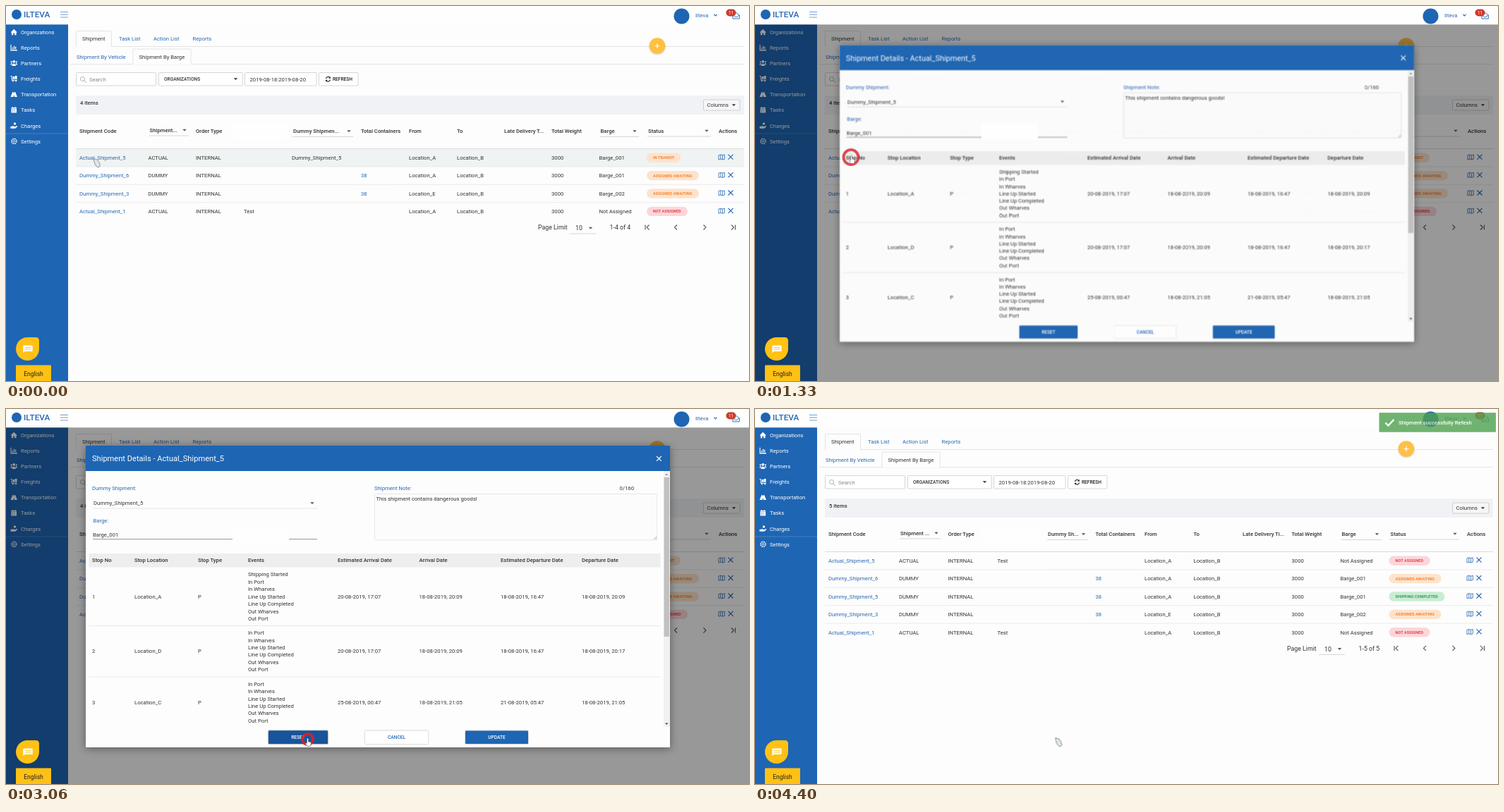
Animation, 1053 px wide and 532 px high, one loop 4.73 s. Source, as an HTML page:

```html
<!DOCTYPE html>
<html lang="en">
<head>
<meta charset="utf-8">
<title>Shipment reset</title>
<style>
html, body { margin: 0; width: 100%; height: 100%; overflow: hidden; background: #fdfdfd; }
svg { display: block; width: 100vw; height: 100vh; }
text { font: 7.7px Roboto, Arial, sans-serif; fill: #333; white-space: pre; }
.b { font-weight: 500; }
.link { fill: #2768b3; }
.white { fill: #fff; }
#modal { transform-origin: 527px 266.5px; }
#spin { transform-origin: 553px 229px; animation: spin 1s linear infinite; }
@keyframes spin { to { transform: rotate(360deg); } }
</style>
</head>
<body>
<script>
const LOOP = 4730;
let css = '';

// Each key is [ms, declarations, easing]; "step-end" holds until the next key.
function anim(id, ...keys) {
  const body = keys.map(([ms, decl, ease]) =>
    `${(ms / LOOP * 100).toFixed(3)}%{${decl};animation-timing-function:${ease || 'linear'}}`).join('');
  css += `@keyframes ${id}{${body}}#${id}{animation:${id} ${LOOP}ms infinite}`;
}

const fade = (id, ...keys) => anim(id, ...keys.map(([ms, o, e]) => [ms, `opacity:${o}`, e]));

// y is the middle of the capitals
function text(x, y, str, cls = '', size = 7.7, extra = '') {
  return `<text x="${x}" y="${(y + size * .355).toFixed(2)}" class="${cls}" style="font-size:${size}px;${extra}">${str}</text>`;
}
const mid = (x, y, str, cls, size, extra = '') => text(x, y, str, cls, size, 'text-anchor:middle;' + extra);
const rect = (x, y, w, h, fill, more = '') => `<rect x="${x}" y="${y}" width="${w}" height="${h}" fill="${fill}" ${more}/>`;
const frame = (x, y, w, h, fill = '#fff', edge = '#ccc') =>
  rect(x + .5, y + .5, w - 1, h - 1, fill, `stroke="${edge}" stroke-width=".8" rx="1"`);
const path = (d, stroke = '#1e65b3', width = 1, fill = 'none') =>
  `<path d="${d}" fill="${fill}" stroke="${stroke}" stroke-width="${width}"/>`;
const hline = (x1, x2, y, color = '#ddd', w = .8) => path(`M${x1} ${y}H${x2}`, color, w);
const solid = (d, color) => `<path d="${d}" fill="${color}"/>`;
const caret = (x, y, color = '#555') => solid(`M${x - 2.7} ${y - 1.3}h5.4l-2.7 2.8z`, color);
const disc = (x, y, r, fill, more = '') => `<circle cx="${x}" cy="${y}" r="${r}" fill="${fill}" ${more}/>`;
const group = (id, ...parts) => `<g id="${id}">${parts.join('')}</g>`;

function sidebar() {
  const names = ['Organizations', 'Reports', 'Partners', 'Freights', 'Transportation', 'Tasks', 'Charges', 'Settings'];
  const icons = [
    'M0 5L5 0l5 5h-1.5v4h-2.5V6h-2v3H1.500V5z',
    'M0 0h1.200v7.500H10V9H0zM2.500 4h1.300v2.700H2.500zM4.700 2h1.300v4.700H4.700zM6.900 3h1.300v3.700H6.900z',
    'M3 2a2 2 0 1 1 4 0a2 2 0 1 1-4 0M2 8.500c0-4.500 6-4.500 6 0zM0 2.500a1.200 1.200 0 1 1 2.400 0a1.200 1.200 0 1 1-2.400 0M7.600 2.500a1.200 1.200 0 1 1 2.400 0a1.200 1.200 0 1 1-2.400 0M0 7c0-3 2-3 2.500-2L1.500 7zM10 7c0-3-2-3-2.500-2L8.500 7z',
    'M0 0h2l.6 6H10v1.200H1.600L1 1.200H0zM3.200 1h2.800v4H3.200zM6.500 0h3v5h-3zM2.500 8a1 1 0 1 1 2 0a1 1 0 1 1-2 0M7 8a1 1 0 1 1 2 0a1 1 0 1 1-2 0',
    'M3 1h1.500v2h1V1H7l3 7.500H5.600V6H4.400v2.500H0z',
    'M1 1h1.500V0h1.200v1h2.600V0h1.200v1H9v1.500H1zM1 3.200h8V9H1zM2.500 4.500v1h1.300v-1zM5.200 4.500v1h1.300v-1zM2.500 6.700v1h1.300v-1zM5.200 6.700v1h1.300v-1z',
    'M0 6h2c2-1.500 3 0 5 .3L10 5v1.500L7 9H0zM4.500 2a1.800 1.800 0 1 1 3.600 0a1.800 1.800 0 1 1-3.600 0'
  ];
  const items = names.map((name, i) => {
    const y = 37.5 + 22.05 * i;
    const icon = icons[i]
      ? `<path transform="translate(6.500 ${y - 4.7}) scale(.95)" d="${icons[i]}" fill="#fff" fill-rule="evenodd"/>`
      : disc(11.5, y, 3.6, 'none', 'stroke="#fff" stroke-width="1.300" stroke-dasharray="2 .8"') +
        disc(11.5, y, 1.4, 'none', 'stroke="#fff" stroke-width=".9"');
    return icon + text(21, y, name, 'white');
  });
  return rect(0, 26, 88, 506, '#1e65b3') + hline(0, 88, 181, '#4f8ac8') + items.join('');
}

function toolbar() {
  return hline(99, 1046, 57.5) + frame(99, 35, 51, 23, '#fdfdfd', '#ddd') + rect(100, 56.5, 49, 2, '#fdfdfd') +
    text(108, 46.5, 'Shipment') + text(160, 46.5, 'Task List', 'link') +
    text(209, 46.5, 'Action List', 'link') + text(264.5, 46.5, 'Reports', 'link') +
    hline(91, 1046, 82.5) + frame(179.5, 60.5, 83, 23, '#fdfdfd', '#ddd') + rect(180.5, 81.5, 81, 2, '#fdfdfd') +
    text(100, 72, 'Shipment By Vehicle', 'link') + text(188.5, 72, 'Shipment By Barge') +
    frame(99, 94, 114, 19.5) + disc(108.5, 103.5, 3, 'none', 'stroke="#999" stroke-width=".8"') +
    path('M110.700 105.700l3 3', '#999', .9) + text(118, 104, 'Search', '', 7.7, 'fill:#888') +
    frame(216, 94, 120, 19.5) + text(224, 104, 'ORGANIZATIONS', 'b', 6.6) + caret(325.5, 103.5, '#333') +
    frame(338, 94, 102.5, 19.5) + text(345.5, 104, '2019-08-18:2019-08-20') +
    frame(443, 94, 56.5, 19.5) + path('M453.500 103a3 3 0 0 1 5.500-1.200M459.500 104.500a3 3 0 0 1-5.500 1.200', '#222', 1.2) +
    solid('M459.800 100v2.700h-2.700zM453 107.500v-2.700h2.700z', '#222') + text(463, 104, 'REFRESH', 'b', 6.6, 'fill:#222') +
    rect(99, 127, 947, 27, '#f1f2f5') + frame(988, 132.5, 52.5, 16, '#f6f6f7', '#c4c4c4') +
    text(993.5, 140.5, 'Columns') + caret(1031.5, 140.5, '#333') +
    disc(923, 56.5, 11.3, '#ffc044', 'style="filter:drop-shadow(0 1px 1px #0003)"') + path('M919.500 56.500h7M923 53v7', '#fff', 1.2);
}

const badges = {
  'IN TRANSIT': [48, '#f58232', '#fde3cc'],
  'ASSIGNED AWAITING': [74, '#f58232', '#fde3cc'],
  'NOT ASSIGNED': [58, '#e5404a', '#fcd6d9'],
  'SHIPPING COMPLETED': [79, '#2a9d4e', '#c9ecd4']
};

function badge(x, y, label) {
  const [w, ink, fill] = badges[label];
  return rect(x, y - 6.7, w, 13.4, fill, 'rx="6.700"') +
    text(x + 9, y, label, '', 5.5, `font-weight:700;letter-spacing:.1px;fill:${ink}`);
}

// cols: x of code, type, order, note, dummy, containers, from, to, late, weight, barge, status, actions
function table(id, cols, heads, pickers, rows) {
  const head = heads.map((h, i) => {
    const p = pickers[i];
    if (!p) return text(cols[i], 177, h, 'b');
    const y = p[2];
    return text(p[0], y, h, 'b') + caret(p[1], y) + hline(p[0] - 1, p[1] + 6, y + 8, '#ccc');
  }).join('');
  const body = rows.map((r, i) => {
    const y = 215.2 + 25.4 * i, a = cols[12];
    return hline(99, 1046, y - 12.7, i ? '#e6e6e6' : '#d2d2d2') +
      r.map((v, c) => !v ? '' : c === 11 ? badge(cols[c], y, v) : text(cols[c], y, v, c === 0 || c === 5 ? 'link' : '')).join('') +
      path(`M${a} ${y - 3.5}l2.800-.8l2.800 .8l2.800-.8v6.300l-2.800 .8l-2.800-.8l-2.800 .8zM${a + 2.8} ${y - 4.3}v6.300M${a + 5.6} ${y - 3.5}v6.300`, '#2768b3', .8) +
      path(`M${a + 13.5} ${y - 4.5}l7 7m0-7l-7 7`, '#2768b3', 1.2);
  }).join('');
  const n = rows.length, y = 314 + 25.4 * (n - 4);
  const pager = text(754, y, 'Page Limit', '', 8.8) + text(807, y + 1, '10', '', 8.8) + caret(828.5, y + 1) +
    hline(799, 836, y + 9, '#ccc') + text(855.5, y, `1-${n} of ${n}`, '', 8.8) +
    path(`M906 ${y - 3.5}v7m5.500-7l-3.500 3.500l3.500 3.500M951 ${y - 3.5}l-3.500 3.500l3.500 3.500M988.500 ${y - 3.5}l3.500 3.500l-3.500 3.500M1028 ${y - 3.5}l3.500 3.500l-3.500 3.500m5.500-7v7`, '#555', 1.1);
  return group(id, text(105, 137.5, `${n} items`, 'b'), head, body, pager);
}

const actual = (code, barge, status, note, dummy) =>
  [code, 'ACTUAL', 'INTERNAL', note, dummy, '', 'Location_A', 'Location_B', '', '3000', barge, status];
const dummy = (n, from, barge, status) =>
  ['Dummy_Shipment_' + n, 'DUMMY', 'INTERNAL', '', '', '38', 'Location_' + from, 'Location_B', '', '3000', 'Barge_00' + barge, status];

const waiting = 'ASSIGNED AWAITING', free = 'NOT ASSIGNED';
const six = dummy(6, 'A', 1, waiting), three = dummy(3, 'E', 2, waiting);
const one = actual('Actual_Shipment_1', 'Not Assigned', free, 'Test', '');

const before = table('before',
  [104, 201.5, 269, 337, 405, 503, 571, 639, 706, 773, 840.5, 908, 1010],
  ['Shipment Code', 'Shipment...', 'Order Type', '', 'Dummy Shipmen...', 'Total Containers', 'From', 'To',
    'Late Delivery T...', 'Total Weight', 'Barge', 'Status', 'Actions'],
  { 1: [203.5, 253, 176], 4: [407, 486, 177.5], 10: [842.5, 891, 177.5], 11: [910, 993, 177] },
  [actual('Actual_Shipment_5', 'Barge_001', 'IN TRANSIT', '', 'Dummy_Shipment_5'), six, three, one]);

const after = table('after',
  [104, 204, 273.5, 343.5, 413, 482.5, 552, 621.5, 691, 760.5, 829.5, 898.5, 1009],
  ['Shipment Code', 'Shipment ...', 'Order Type', '', 'Dummy Sh...', 'Total Containers', 'From', 'To',
    'Late Delivery Ti...', 'Total Weight', 'Barge', 'Status', 'Actions'],
  { 1: [206, 257, 176], 4: [415, 465.5, 177.5], 10: [831.5, 881.5, 177.5], 11: [900.5, 992, 177] },
  [actual('Actual_Shipment_5', 'Not Assigned', free, 'Test', ''), six,
    dummy(5, 'A', 1, 'SHIPPING COMPLETED'), three, one]);

function modal() {
  const cols = [122, 182, 272, 343, 470, 585.5, 701, 816];
  const heads = ['Stop No', 'Stop Location', 'Stop Type', 'Events', 'Estimated Arrival Date', 'Arrival Date',
    'Estimated Departure Date', 'Departure Date'];
  const events = ['Shipping Started', 'In Port', 'In Wharves', 'Line Up Started', 'Line Up Completed', 'Out Wharves', 'Out Port'];
  const stops = [
    [266, '1', 'Location_A', 'P', '', '20-08-2019, 17:07', '18-08-2019, 20:09', '18-08-2019, 16:47', '18-08-2019, 20:09'],
    [343.5, '2', 'Location_D', 'P', '', '20-08-2019, 17:07', '18-08-2019, 20:09', '18-08-2019, 16:47', '18-08-2019, 20:17'],
    [416, '3', 'Location_C', 'P', '', '25-08-2019, 00:47', '18-08-2019, 21:05', '21-08-2019, 05:47', '18-08-2019, 21:05']
  ];
  const rows = stops.map(([y, ...cells], i) => {
    const list = i ? events.slice(1) : events;
    return cells.map((c, k) => text(cols[k], y, c)).join('') +
      list.map((e, k) => text(343, y + (k - (list.length - 1) / 2) * 10.45, e)).join('');
  }).join('');
  const button = (x, w, label, fill, cls) =>
    rect(x, 456.5, w, 18.5, fill, 'rx="1" style="filter:drop-shadow(0 .6px .8px #0005)"') + mid(x + w / 2, 465.7, label, 'b ' + cls, 6.6);
  return `<clipPath id="clip"><rect id="slot" x="80" y="20" width="894" height="500"/></clipPath>` +
    `<g id="modal" clip-path="url(#clip)">` +
    rect(113, 52, 828, 428, '#fdfdfd', 'rx="1" style="filter:drop-shadow(0 2px 6px #0006)"') +
    rect(113, 52, 828, 36, '#1e65b3') +
    text(122, 70.5, 'Shipment Details - Actual_Shipment_5', 'white', 11.1) +
    path('M922 67l6.800 6.800m0-6.800l-6.800 6.800', '#fff', 1.1) +
    text(122, 112.5, 'Dummy Shipment:', 'link') + text(124, 133.5, 'Dummy_Shipment_5') + caret(434, 133.5) +
    hline(124, 441, 141, '#ddd') + text(123.5, 158, 'Barge:', 'link') + text(123, 178.5, 'Barge_001') +
    hline(123, 441, 184.7, '#777') + text(522, 112.5, 'Shipment Note:', 'link') + text(869.5, 112.5, '0/160') +
    frame(522, 120, 401, 66.5, '#fcfcfc', '#e3e3e3') + text(524.5, 127.5, 'This shipment contains dangerous goods!') +
    path('M918 185l4-4m-1.500 4l1.500-1.500', '#888', .7) +
    rect(117.5, 205, 810, 19.5, '#eee') + heads.map((h, i) => text(cols[i], 214.5, h, 'b')).join('') +
    hline(117.5, 927.5, 307.5, '#e4e4e4') + hline(117.5, 927.5, 380, '#e4e4e4') + rows +
    rect(932, 88, 9, 363, '#f1f1f1') + rect(932.5, 97, 7.5, 226, '#c1c1c1') +
    solid('M934 94h4.500l-2.250-2.500z', '#999') + solid('M934 445.500h4.500l-2.250 2.500z', '#444') +
    button(372, 84, 'RESET', '#1e65b3', 'white') + group('hover', button(372, 84, 'RESET', '#17549b', 'white')) +
    button(509, 89, 'CANCEL', '#fff', 'link') + button(651, 89, 'UPDATE', '#1e65b3', 'white') + '</g>';
}

function navbar() {
  return rect(0, 0, 1053, 26.3, '#fefefe') + disc(15, 12, 7, '#1e65b3') +
    text(25, 12.3, 'ILTEVA', 'b link', 11.8) +
    path('M77 8.500h11M77 12.200h11M77 16h11', '#4f86c2', .8) +
    disc(957.5, 14.5, 11, '#1e65b3') + text(977, 13, 'Ilteva', 'link') + path('M1003.500 11.800l2 2l2-2', '#1e65b3', 1.2) +
    path('M1030 13l4.700-3.500l4.700 3.500v5h-9.400zM1030 13l4.700 3l4.700-3', '#2768b3', .9) +
    rect(1020.5, 4.5, 14, 10, '#cb3a2c', 'rx="5"') + mid(1027.5, 9.5, '11', 'white', 6.4);
}

function chat() {
  return solid('M30.500 470H42q5 0 5 5v11.500a16.500 16.500 0 1 1-16.500-16.500z', '#ffc114') +
    solid('M25.500 481.500h11q1.200 0 1.200 1.200v6q0 1.200-1.200 1.200h-9.500l-2.700 2.200v-9.400q0-1.200 1.200-1.200z', '#fff') +
    path('M27 484.600h8M27 487h8', '#ffc114', .9) +
    rect(14, 509.5, 50, 23, '#ffc114', 'rx="1"') + mid(39, 522, 'English', '', 8.5, 'fill:#222');
}

const ring = (id, x, y) => `<circle id="${id}" cx="${x}" cy="${y}" r="2" fill="none" stroke="#d6222b" stroke-width="3.800"/>`;

const scene = [
  sidebar(), group('row', rect(99, 202.5, 947, 25.4, '#eff3f3')), toolbar(), before, after,
  group('veil', rect(99, 203, 947, 101, '#f4f4ff')),
  group('loader', disc(553, 229, 5.5, 'none', 'id="spin" stroke="#c2c2c2" stroke-width="1.300" stroke-dasharray="29 5.500"'),
    text(562, 229, 'LOADING...', '', 6.9, 'fill:#bbb')),
  group('shade', rect(0, 26, 1053, 506, '#000')),
  modal(),
  rect(321, 166.5, 80, 23.3, '#fefefe', 'rx="3"'),
  navbar(),
  group('toast', rect(884.5, 5.3, 165.5, 27.4, '#51a351', 'rx="1"'),
    path('M893.500 19.500l4 4l8-8.500', '#fff', 2.4), text(912, 19, 'Shipment successfully Refesh', 'b white')),
  chat(), ring('ringA', 136, 214.5), ring('ringB', 427.5, 468.5),
  group('cursor',
    group('arrow', path('M.3 .3L6 2.500Q9 5.500 9.300 11Q8.500 13 6 12.800Q1 10 .3 .3z', '#82888d', .9, '#dfe5e8')),
    group('hand', path('M2.500 7V1.200a1 1 0 0 1 2 0V5l3 .6q1 .3 .8 1.600l-.7 4.200h-4.600L.6 8q.6-1.600 1.900-1z', '#666', .7, '#fff')))
];

fade('row', [0, 1, 'step-end'], [1130, 0], [4730, 0]);
fade('before', [0, 1, 'step-end'], [3800, 0], [4730, 0]);
fade('after', [0, 0, 'step-end'], [3800, 1], [4730, 1]);
fade('veil', [0, 0], [3250, 0], [3400, .2], [3930, .2], [4200, 0], [4730, 0]);
fade('loader', [0, 0], [3300, 0], [3400, .8], [3500, 1], [3800, 1], [4060, 0], [4730, 0]);
fade('shade', [0, 0], [1060, 0], [1195, .4], [3130, .4], [3300, 0], [4730, 0]);
fade('toast', [0, 0], [3200, 0], [3390, .82], [4730, .82]);
fade('hover', [0, 0], [2560, 0], [2660, 1], [4730, 1]);
fade('arrow', [0, 1, 'step-end'], [330, 0, 'step-end'], [1930, 1, 'step-end'], [2530, 0, 'step-end'], [3260, 1], [4730, 1]);
fade('hand', [0, 0, 'step-end'], [330, 1, 'step-end'], [1930, 0, 'step-end'], [2530, 1, 'step-end'], [3260, 0], [4730, 0]);

const pose = (scale, opacity) => `transform:scale(${scale});opacity:${opacity}`;
anim('modal', [0, pose(.7, 0), 'step-end'], [1195, pose(.7, .36)], [1225, pose(.7, .36)],
  [1330, pose(.982, .98), 'ease-out'], [1400, pose(1.033, 1), 'ease-in-out'], [1480, pose(.97, 1), 'ease-in-out'],
  [1570, pose(1, 1)], [3130, pose(1, 1), 'ease-in'], [3280, pose(.5, 0)], [4730, pose(.5, 0)]);
anim('slot', [0, 'x:130px;width:794px', 'step-end'], [1260, 'x:80px;width:894px'], [4730, 'x:80px;width:894px']);

const moves = [[0, 124, 216], [260, 124, 216], [460, 133, 212], [1930, 133, 212], [2130, 354, 361, 'ease-out'],
  [2400, 422, 467], [2600, 424, 467], [3260, 424, 467], [3400, 427.5, 467, 'step-end'], [4400, 425.5, 466], [4730, 425.5, 466]];
anim('cursor', ...moves.map(([ms, x, y, ease]) => [ms, `transform:translate(${x}px,${y}px)`, ease]));

for (const [id, start] of [['ringA', 930], ['ringB', 2770]]) {
  anim(id, [0, 'r:2px;opacity:0', 'step-end'], [start, 'r:2px;opacity:.9'], [start + 280, 'r:7.3px;opacity:.9'],
    [start + 400, 'r:10.5px;opacity:.8'], [start + 630, 'r:16.3px;opacity:.5'],
    [start + 980, 'r:25px;opacity:0'], [LOOP, 'r:25px;opacity:0']);
}

document.head.insertAdjacentHTML('beforeend', `<style>${css}</style>`);
document.body.innerHTML = `<svg viewBox="0 0 1053 532">${scene.join('')}</svg>`;
</script>
</body>
</html>
```
